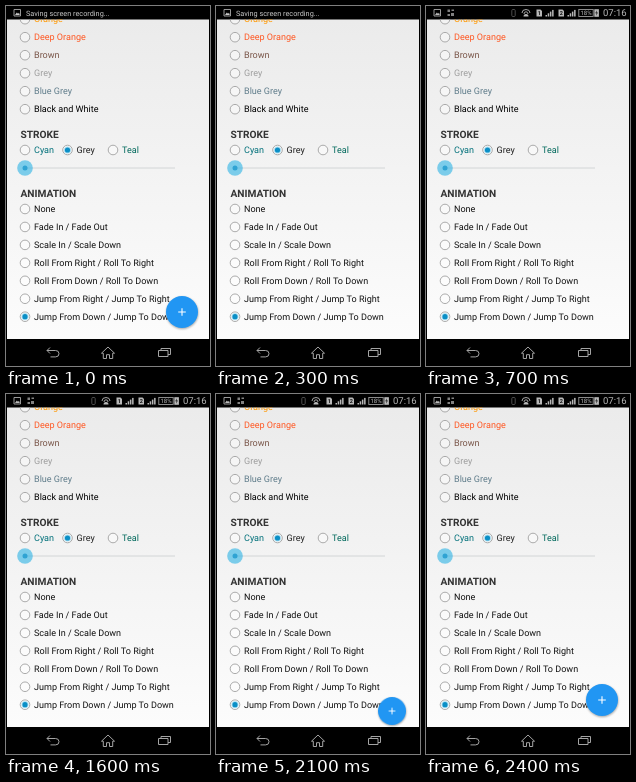
Recreate the animation shown at these times as an HTML page. Size 204 by 360 pixels, loop 2.5 s.

```html
<!DOCTYPE html>
<html lang="en">
<head>
<meta charset="utf-8">
<title>Floating action button</title>
<style>
html, body { margin: 0; width: 100%; height: 100%; overflow: hidden; background: #000; }
svg { display: block; width: 204px; height: 360px; font: 9.05px Roboto, sans-serif; text-rendering: geometricPrecision; }
.head { font-size: 10.2px; font-weight: 700; fill: #333; }
.line { fill: none; stroke: #a4a4a4; stroke-width: 1; }
#fab { transform-origin: 176px 306px; }
</style>
</head>
<body>
<svg viewBox="0 0 204 360">
  <defs>
    <linearGradient id="paper" x2="0" y2="1">
      <stop stop-color="#ebebeb"/><stop offset="1" stop-color="#fcfcfc"/>
    </linearGradient>
    <filter id="soft" x="-30%" y="-30%" width="160%" height="160%"><feGaussianBlur stdDeviation="1"/></filter>
    <clipPath id="page"><rect x="1" y="13.5" width="202" height="319.5"/></clipPath>
    <clipPath id="bar"><rect width="204" height="13.5"/></clipPath>
    <g id="picture">
      <path d="M8 3.5h6.5v6.5H8z" fill="none" stroke="#aaa" stroke-width=".9"/>
      <path d="M9 9l1.8-2.4 1.2 1.2 1-1 .8 2.2z"/>
    </g>
  </defs>
  <rect width="204" height="360"/>

  <g clip-path="url(#page)">
    <rect y="13" width="204" height="320" fill="url(#paper)"/>
    <g id="options"></g>
    <text class="head" x="14.5" y="131.7">STROKE</text>
    <text class="head" x="14.5" y="190.7">ANIMATION</text>
    <path d="M19 162H169" stroke="#d2d5d6"/>
    <circle cx="19" cy="162" r="7.8" fill="#33b5e5" opacity=".62"/>
    <circle cx="19" cy="162" r="2.5" fill="#2fa3d3"/>
    <g id="fab">
      <circle cx="176.3" cy="307" r="16" opacity=".35" filter="url(#soft)"/>
      <circle cx="176" cy="306" r="16" fill="#2196f3"/>
      <path d="M172.2 306h7.6M176 302.2v7.6" stroke="#fff" stroke-width="1.1"/>
    </g>
  </g>

  <g clip-path="url(#bar)">
    <g id="ticker" fill="#c8c8c8">
      <use href="#picture"/>
      <text x="20" y="9.8" font-size="7.3">Saving screen recording...</text>
    </g>
    <g id="icons" fill="#b8b8b8">
      <use href="#picture"/>
      <path d="M21.5 3.5h2.5v2.5h-2.5zM25.5 3.5h2.5v1.5h-2.5zM21.5 8h2.5v2h-2.5zM25 7h3v3h-3z" opacity=".7"/>
      <rect x="85.8" y="3.5" width="3.4" height="7" rx="1" fill="none" stroke="#555" stroke-width=".9"/>
      <path class="line" d="M96 7q0-3.5 4-3.5t4 3.5M98 8q0-2.2 2-2.2t2 2.2"/>
      <path d="M97.5 10.5q0-2.5 2.5-2.5t2.5 2.5z"/>
      <g id="sims"></g>
      <rect x="152.8" y="3.5" width="14.4" height="7" fill="none" stroke="#999" stroke-width=".9"/>
      <rect x="168.3" y="3.2" width="4.6" height="7.6"/>
      <path d="M171 4.2l-1.8 3h1.3l-.5 2.6 2-3.2h-1.3z" fill="#222"/>
      <text x="160" y="9.1" font-size="6" text-anchor="middle">18%</text>
      <text x="177" y="10.4" font-size="9.5">07:16</text>
    </g>
  </g>

  <g class="line">
    <path d="M41 344.5h8.5q3.5 0 3.5 3.2t-3.5 3.2h-5M44 341.5l-3 3 3 3"/>
    <path d="M95.5 347.2l6.5-6.2 6.5 6.2h-1.8v5.3h-3.2v-3.8h-3v3.8h-3.2v-5.3z"/>
    <path d="M152.5 344.5h9.5v6h-9.5zM155 344v-1.5h9.5v6h-2.5"/>
  </g>
</svg>

<script>
const $ = id => document.getElementById(id);
const LOOP = 2500;

function option(x, y, label, color = '#111', on = false) {
  const dot = on
    ? `<circle cx="${x}" cy="${y}" r="3.6" fill="#33b5e5" opacity=".35"/>
       <circle cx="${x}" cy="${y}" r="2.6" fill="#0b8fc6"/>` : '';
  return `<circle cx="${x}" cy="${y}" r="4.8" fill="#fff" fill-opacity=".4" stroke="#a2a2a2" stroke-width=".9"/>${dot}
    <text x="${x + 9}" y="${y + 3.2}" fill="${color}">${label}</text>`;
}

const colors = [
  ['Orange', '#ff9800'], ['Deep Orange', '#ff5722'], ['Brown', '#795548'],
  ['Grey', '#9e9e9e'], ['Blue Grey', '#607d8b'], ['Black and White', '#000']
];
const effects = [
  'None', 'Fade In / Fade Out', 'Scale In / Scale Down',
  'Roll From Right / Roll To Right', 'Roll From Down / Roll To Down',
  'Jump From Right / Jump To Right', 'Jump From Down / Jump To Down'
];
$('options').innerHTML = [
  ...colors.map(([name, color], i) => option(19, 13.2 + 18 * i, name, color)),
  option(19, 144, 'Cyan', '#00707a'),
  option(61.5, 144, 'Grey', '#222', true),
  option(107, 144, 'Teal', '#00695c'),
  ...effects.map((name, i) => option(19, 203 + 17.95 * i, name, '#111', i === 6))
].join('');

// Two SIM cards, each followed by its signal bars
$('sims').innerHTML = [110.5, 132.5].map((x, i) => `
  <path d="M${x} 3.5h4l1.5 1.5v5.5h-5.5z"/>
  <text x="${x + 2.8}" y="9.3" font-size="5.5" font-weight="700" text-anchor="middle" fill="#111">${i + 1}</text>` +
  [0, 1, 2, 3].map(k =>
    `<rect x="${x + 9 + k * 2.2}" y="${9 - k * 1.7}" width="1.5" height="${1.5 + k * 1.7}"/>`).join('')).join('');

// Each step: [start in ms, vertical shift, opacity, scale], held until the next one
function play(id, steps) {
  const frames = [...steps, [LOOP, ...steps.at(-1).slice(1)]].map(([at, y, opacity = 1, scale = 1]) => ({
    offset: at / LOOP, transform: `translateY(${y}px) scale(${scale})`, opacity, easing: 'steps(1, end)'
  }));
  $(id).animate(frames, { duration: LOOP, iterations: Infinity });
}

// The button shrinks as it drops
const jump = [[0, 0], [100, 2], [200, 18], [300, 60], [1900, 37], [2000, 23], [2100, 11], [2200, 2], [2300, 0]];
play('fab', jump.map(([at, y]) => [at, y, 1, 1 - y * .0114]));
play('ticker', [[0, 0], [500, -7, .5], [600, -14, 0]]);
play('icons', [[0, 14, 0], [500, 7, .5], [600, 0]]);
</script>
</body>
</html>
```
